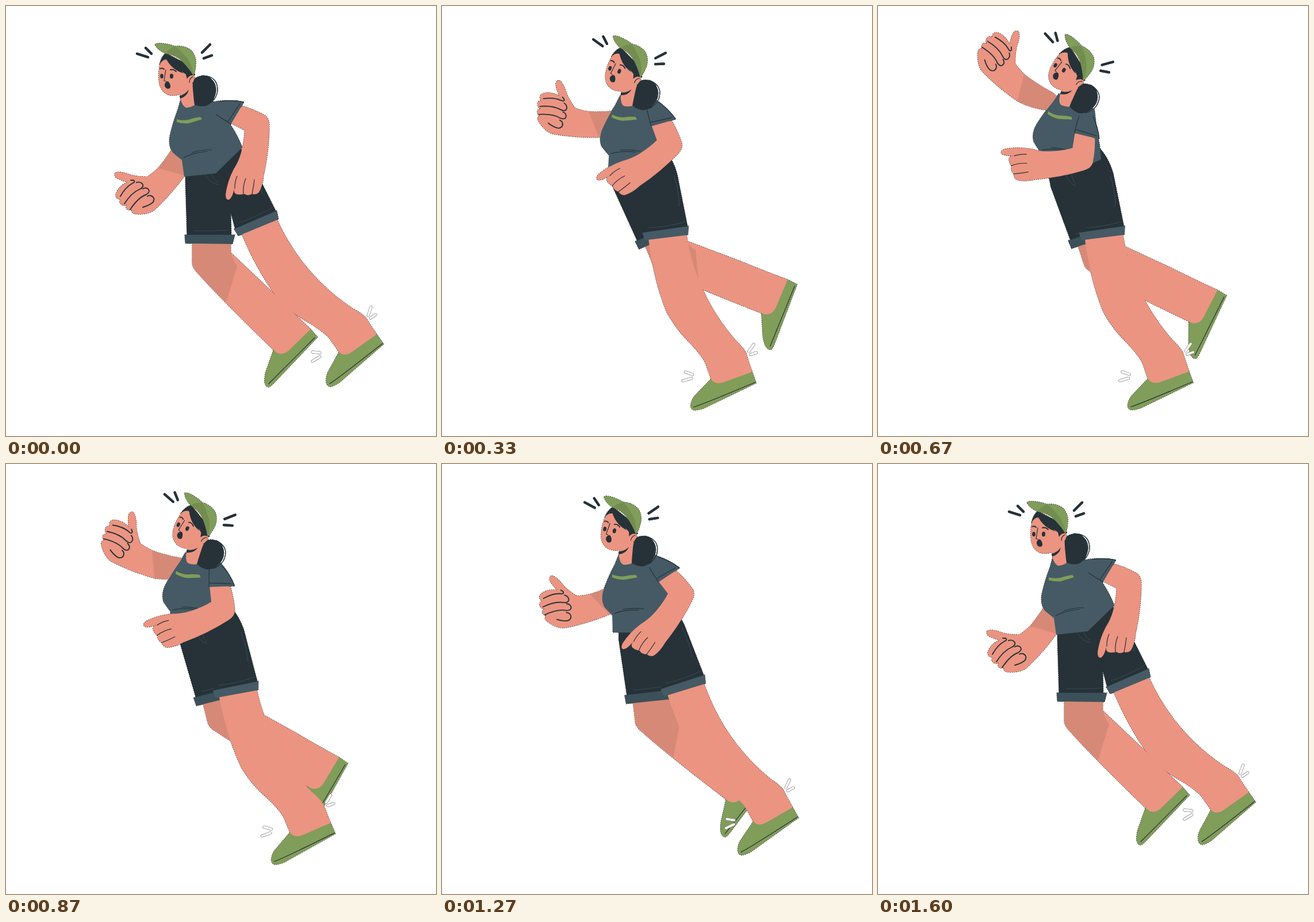
These frames come from a looping animation (748 by 748 pixels, 1660 ms). An HTML page:

```html
<!DOCTYPE html>
<html lang="en">
<head>
<meta charset="utf-8">
<title>Startled walker</title>
<style>
  @property --n { syntax: "<number>"; inherits: true; initial-value: 0; }

  html, body { margin: 0; width: 100%; height: 100%; overflow: hidden; background: #fff; }

  /* --n counts 48 steps; every joint swings up, then back, at its own pace. */
  svg {
    display: block; width: 100%; height: 100%;
    animation: tick 1660ms -5ms infinite;
    --p: min(var(--n) / 18, (48 - var(--n)) / 30);
    --q: min(var(--n) / 12.5, (48 - var(--n)) / 35.5);
    --r: min(var(--n) / 10.8, (48 - var(--n)) / 37.2);
    --u: (var(--p)) / .933;
    --bump: 4 * (var(--u)) * (1 - (var(--u)));
  }
  @keyframes tick {
    0% { --n: 0; animation-timing-function: steps(48); }
    96.386%, 100% { --n: 48; }
  }

  .torso { transform-origin: 338px 188px; transform: rotate(calc((var(--p)) * 20.5deg)); }
  .head { transform-origin: 325px 183px; transform: rotate(calc((var(--p)) * 32deg)); }
  .near-leg { transform-origin: 350px 213px; transform: rotate(calc((var(--q)) * 19.2deg)); }
  .far-leg { transform-origin: 352px 342px; transform: rotate(calc((var(--r)) * -24.6deg)); }
  .near-arm {
    transform-origin: 355.7px 179.5px;
    transform: translateY(calc((var(--bump)) * -14px)) rotate(calc((var(--p)) * 78deg));
  }
  .far-arm {
    transform-origin: 343px 195px;
    transform: translate(calc((var(--bump)) * 30px), calc((var(--bump)) * -1.5px)) rotate(calc((var(--p)) * 95deg));
  }

  .skin { fill: #eb9481; }
  .shade { fill: #d68977; stroke: none; }
  .dark { fill: #263238; }
  .cloth { fill: #455a64; }
  .far-cuff { fill: #3c5059; }
  .green { fill: #809d5a; }
  .panel { fill: #738d51; stroke: none; }
  .ink, .seam, .alert, .spark, .rim { fill: none; stroke-linecap: round; stroke-linejoin: round; stroke-dasharray: none; }
  .ink { stroke: #263238; stroke-width: 1.2; }
  .bold { stroke-width: 1.9; }
  .seam { stroke: #3a4c55; stroke-width: .9; }
  .alert { stroke: #263238; stroke-width: 4.2; }
  .rim { stroke: #777; stroke-width: 4.8; }
  .spark { stroke: #fff; stroke-width: 3.8; }
  .edge { stroke: #222; stroke-width: 1.2; stroke-dasharray: 2 1.6; }
</style>
</head>
<body>
<svg viewBox="0 0 748 748">
  <use class="edge" href="#walker"/>
  <g id="walker">
    <g class="far-arm">
      <path class="skin" d="M315 215 L297 234 Q284 258 267 279 Q258 289 246 297 Q225 297 212 292 Q197 287 190 290 Q187 294 192 299 Q201 304 212 306 Q196 313 191 327 Q190 336 199 336 Q195 344 204 347 Q207 348 210 345 Q206 354 215 355 L219 354 Q216 361 228 362 Q249 363 259 354 Q287 328 311 295 Q324 272 328 245 L335 215Z"/>
      <path class="shade" d="M315 215 L297 234 Q284 258 267 279 L264 282 L311 295 Q324 272 328 245 L335 215Z"/>
      <path class="ink bold" d="M199 331 Q208 315 219 309 Q226 306 222 303 L217 303 M206 344 Q218 325 232 319 Q241 315 237 309 Q233 305 227 307 M216 354 Q230 333 244 328 Q252 323 247 318 Q243 315 238 318 M238 350 Q250 347 256 341 Q260 333 252 330 Q249 329 246 331"/>
    </g>

    <g class="far-leg">
      <path class="green" d="M465 599 L452 636 Q449 648 450 655 Q452 663 457 663 Q461 661 465 657 L542 576 L530 562Z"/>
      <path class="ink" d="M457 657 L537 577"/>
      <path class="skin" d="M324 405 V448 Q325 456 333 464 Q372 508 466 599 L471 603 Q481 608 491 600 L530 562 Q500 534 465 499 L391 429 V405Z"/>
      <path class="shade" d="M324 405 V448 Q325 456 333 464 Q350 484 383 515 L402 453 Q394 440 391 429 V405Z"/>
      <path class="dark" d="M316 270 L312 300 L315 402 H392 L391 360 L400 300 L385 270Z"/>
      <path class="seam" d="M327 391 Q350 392 386 390"/>
      <path class="far-cuff" d="M311 398 L398 398 L394 414 L312 413Z"/>
    </g>

    <g class="near-leg">
      <path class="green" d="M579 602 L560 637 Q556 645 557 655 Q559 663 566 662 Q572 660 580 655 L657 588 L645 571Z"/>
      <path class="ink" d="M563 657 Q575 650 655 587"/>
      <path class="skin" d="M405 380 L411 399 Q438 463 473 509 Q495 533 525 550 Q555 568 564 580 L579 602 Q587 610 600 603 L645 571 Q632 552 626 542 Q618 534 603 526 Q540 484 500 423 Q483 397 470 368Z"/>
      <path class="dark" d="M392 236 Q414 250 428 274 L470 358 L399 389 L389 352 L335 285 L345 240Z"/>
      <path class="seam" d="M405 377 Q436 367 464 350 M346 293 Q355 309 370 311 M358 293 Q362 303 369 307 M424 279 Q440 303 446 327"/>
      <path class="cloth" d="M397 388 L471 356 L474 371 L404 400Z"/>
      <path class="rim" d="M635 524 L630 538 M643 537 L634 543 M533 602 L546 603 M533 618 L546 610"/>
      <path class="spark" d="M635 524 L630 538 M643 537 L634 543 M533 602 L546 603 M533 618 L546 610"/>
    </g>

    <g class="torso">
      <path class="cloth" d="M304 162 L299 180 Q291 200 285 226 Q282 243 290 255 Q298 262 306 268 L310 297 L365 291 L411 246 Q403 225 390 206 L372 168 L355 166 L330 170Z"/>
      <path class="green" stroke="none" d="M297 197 Q306 200 317 198 Q328 194 338 193 L341 197 Q328 201 318 204 Q307 205 297 202Z"/>
      <path class="ink" d="M323 255 Q340 250 358 250 M309 264 Q325 255 350 253"/>
    </g>

    <g class="near-arm">
      <path class="skin" d="M400 185 L411 174 Q432 180 450 190 Q458 195 458 208 Q458 250 448 295 Q447 312 440 324 Q435 329 428 327 Q420 331 415 327 Q404 329 400 327 Q396 325 397 318 Q394 333 388 337 Q382 338 382 328 Q385 305 396 284 Q405 270 409 255 Q415 232 415 216 L391 204Z"/>
      <path class="ink" d="M398 317 Q398 305 402 296 M413 327 Q412 312 417 300 M428 327 Q431 312 432 302"/>
      <path class="cloth" d="M354 168 Q385 161 414 167 L391 206 Q372 198 350 190Z"/>
      <path class="ink" d="M366 189 Q377 197 391 205 M386 201 L407 170 M372 166 Q395 163 413 167"/>
    </g>

    <g class="head">
      <path class="dark" d="M326 128 Q337 119 349 122 Q363 128 364 146 Q364 168 347 174 Q332 176 324 169 Q329 160 324 146Z"/>
      <path class="ink" d="M342 121 Q369 122 368 148 Q366 160 358 167 M350 122 Q376 138 357 168"/>
      <path class="skin" d="M302 146 L304 164 Q308 176 314 177 Q323 176 328 172 Q326 160 324 130Z"/>
      <path class="dark" stroke="none" d="M302 156 Q312 154 318 145 Q316 157 303 161Z"/>
      <path class="skin" d="M271 92 Q264 108 266 130 Q268 150 284 155 Q300 158 312 148 Q318 142 321 136 Q328 132 328 123 Q326 117 320 120 L310 100 L285 85Z"/>
      <path class="dark" d="M267 102 Q270 88 278 82 L320 104 L329 120 L321 121 Q316 124 315 127 L313 119 L305 113 L309 117 Q290 112 279 93 Q272 93 267 102Z"/>
      <path class="ink" d="M325 123 Q319 126 319 133 M278 111 L275 130 L278 131"/>
      <path class="ink bold" d="M268 109 Q272 107 275 110 M286 111 Q291 109 296 114"/>
      <ellipse class="dark" cx="271" cy="122" rx="2.8" ry="4"/>
      <ellipse class="dark" cx="288" cy="122" rx="3" ry="4.2"/>
      <path class="dark" d="M276 136 Q279 129 283 132 Q288 139 285 143 Q279 146 276 139Z"/>
      <path class="green" d="M259 67 Q262 64 272 65 Q283 66 294 70 Q310 68 322 77 Q332 88 330 104 Q329 115 326 121 Q317 106 303 93 Q291 84 278 83 Q263 76 259 67Z"/>
      <path class="panel" d="M294 70 Q302 75 316 92 Q325 106 326 121 Q317 106 303 93 Q291 84 278 82 Q284 74 294 70Z"/>
      <path class="alert" d="M228 83 L247 89 M243 73 L253 83 M341 81 L355 67 M344 91 L358 86"/>
    </g>
  </g>
</svg>
</body>
</html>
```
